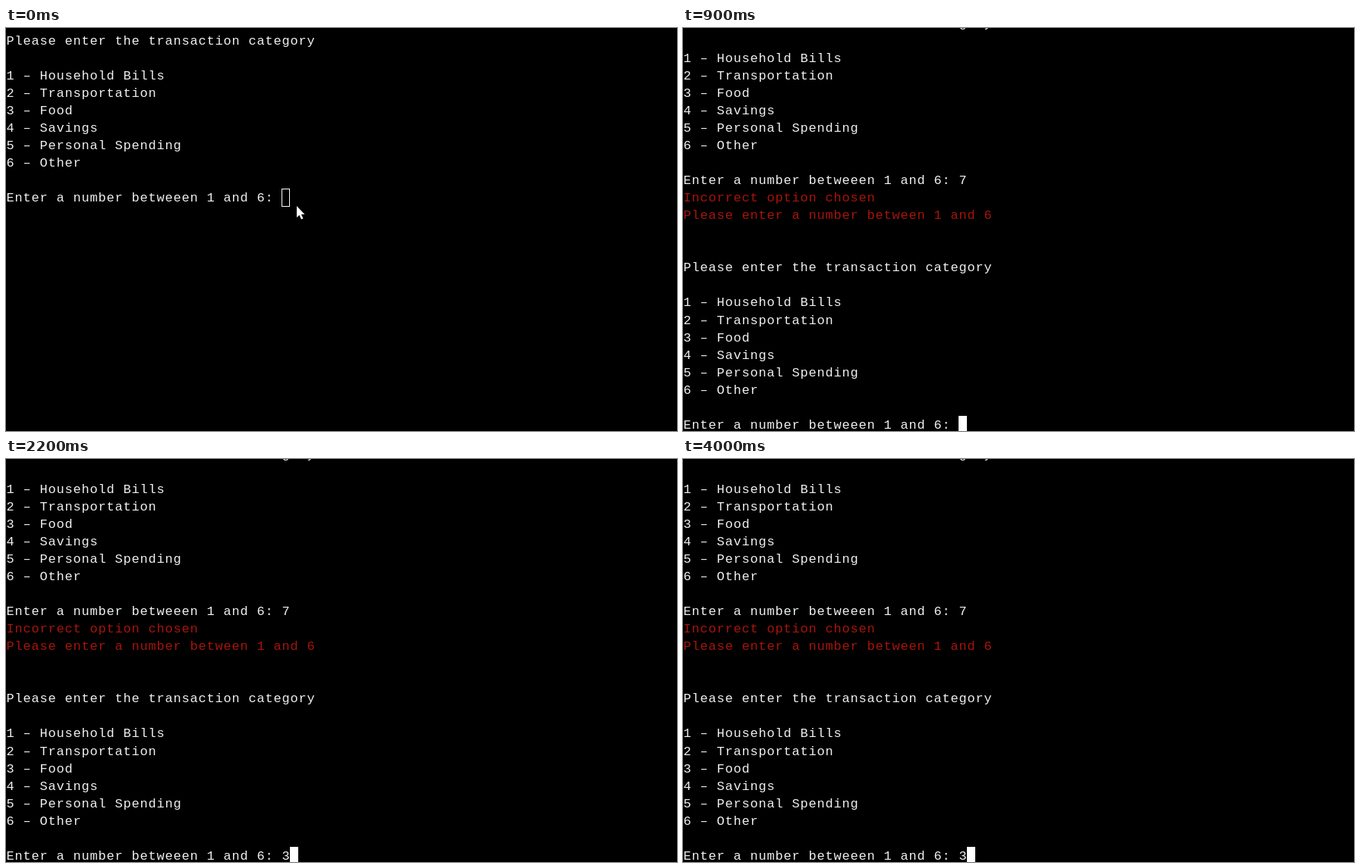
An HTML page with a canvas that plays this animation: 884 px wide and 532 px high, repeating every 4200 ms.

```html
<!DOCTYPE html>
<html lang="en">
<head>
<meta charset="utf-8">
<title>Terminal menu</title>
<style>
html, body { margin: 0; width: 100%; height: 100%; overflow: hidden; background: #000; }
canvas { display: block; }
</style>
</head>
<body>
<canvas id="screen" width="884" height="532"></canvas>
<script>
const ctx = document.getElementById("screen").getContext("2d", { alpha: false });
const COL = 11, ROW = 23.05, TOP = 4.7, LOOP = 4200;
const WHITE = "#f0f0f0", RED = "#a8140c";

const menu = [
  "Please enter the transaction category", "",
  ...["Household Bills", "Transportation", "Food", "Savings", "Personal Spending", "Other"]
    .map((name, i) => `${i + 1} – ${name}`),
  "", "Enter a number betweeen 1 and 6: "
];
const errors = ["Incorrect option chosen", "Please enter a number between 1 and 6"];

const rowTop = row => Math.round(TOP + row * ROW);

function drawLine(text, row) {
  ctx.fillStyle = errors.includes(text) ? RED : WHITE;
  ctx.fillText(text, 0.4, rowTop(row) + 17);
}

function drawCaret(col, row, solid) {
  const x = col * COL, y = rowTop(row);
  ctx.fillStyle = ctx.strokeStyle = "#fff";
  if (solid) ctx.fillRect(x, y, COL, 24);
  else ctx.strokeRect(x + 0.5, y + 0.5, COL - 1, 23);
}

function drawPointer(x, y) {
  ctx.fillStyle = "#fff";
  ctx.fill(new Path2D(`M${x} ${y}v15l3.5-3 2.5 5.5 2.5-1-2.5-5.5h4.5z`));
}

function draw(t) {
  const retry = t >= 900;
  const first = t < 100 ? "" : "7";
  const second = t < 2200 ? "" : "3";
  const lines = [...menu];
  lines[lines.length - 1] += first;
  if (retry) {
    lines.push(...errors, "", "", ...menu);
    lines[lines.length - 1] += second;
  }
  const scroll = retry ? 1 : 0;
  const last = lines.length - 1;
  const focused = t >= 100 && !(t >= 3300 && t < 4000);

  ctx.fillStyle = "#000";
  ctx.fillRect(0, 0, 884, 532);
  ctx.font = '17px "Liberation Mono", monospace';
  ctx.letterSpacing = "0.798px";
  lines.forEach((text, i) => drawLine(text, i - scroll));
  drawCaret(lines[last].length, last - scroll, focused);
  if (t < 100) drawPointer(383, 235);
}

const start = performance.now();
function tick() {
  draw((performance.now() - start) % LOOP);
  requestAnimationFrame(tick);
}
tick();
</script>
</body>
</html>
```
